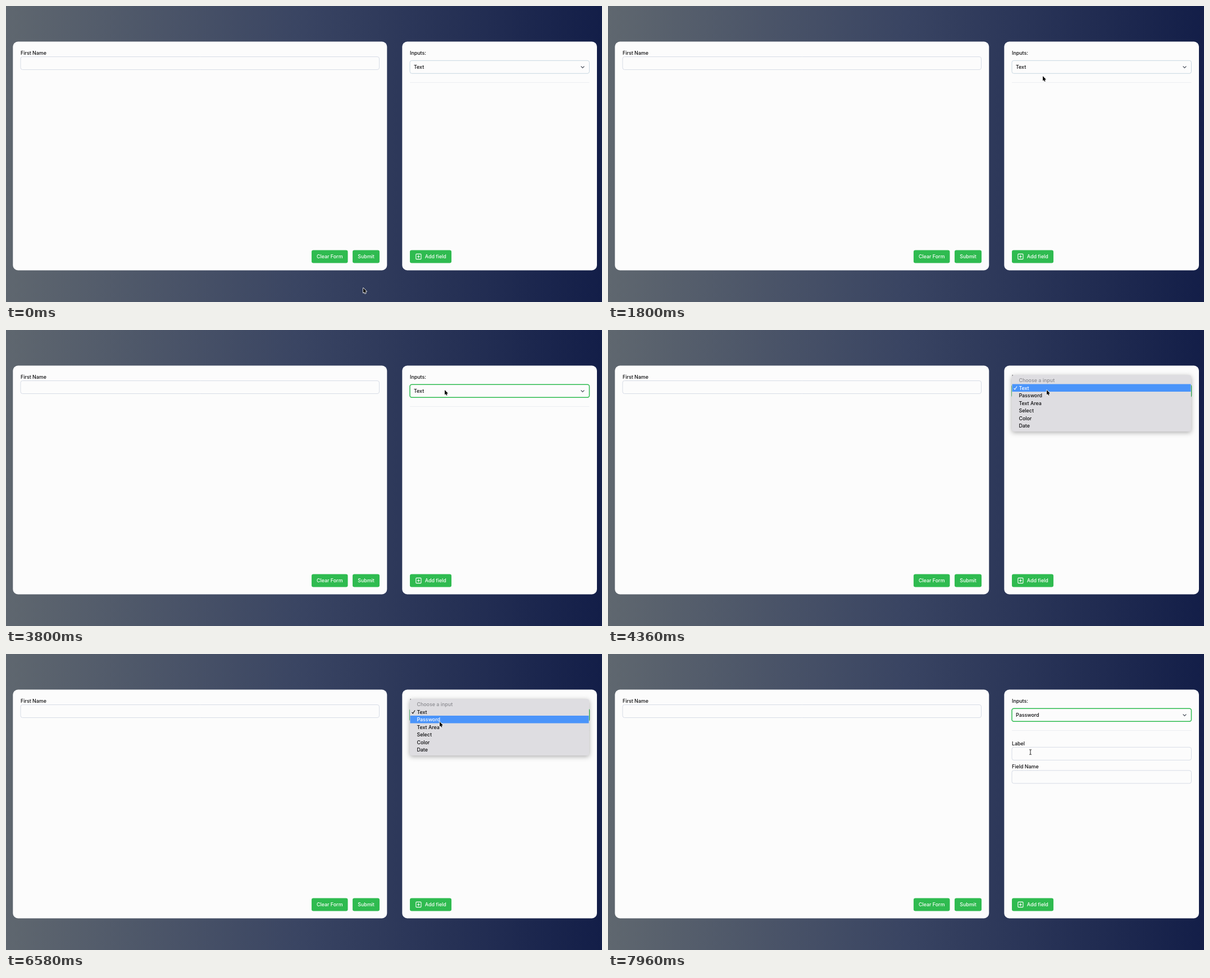
Write an HTML page with a canvas that moves like this. It is 1061x528 px and loops after 8000 ms.

```html
<!DOCTYPE html>
<html lang="en">
<head>
<meta charset="utf-8">
<title>Form builder</title>
<style>
html, body { margin: 0; width: 100%; height: 100%; overflow: hidden; background: #394462; }
canvas { display: block; }
</style>
</head>
<body>
<canvas id="stage" width="1061" height="528"></canvas>
<script>
const stage = document.getElementById('stage');
const c = stage.getContext('2d');
const LOOP = 8000;
const FOCUS = 3760, OPEN = 3900, CLOSE = 6740, IBEAM = 7060;
const GREEN = '#2fbb50', PAPER = '#fcfcfc', INK = '#0b0b0d', EDGE = '#d7dce6';
const OPTIONS = ['Choose a input', 'Text', 'Password', 'Text Area', 'Select', 'Color', 'Date'];
const LEFT = 719, WIDE = 319.5, BOX_H = 23;
const MENU_Y = 83.1, ROW = 13.5;

// resting and turning points of the pointer
const PATH = [
  { t: 0, x: 636, y: 503 },
  { t: 840, x: 685, y: 329 },
  { t: 1800, x: 774, y: 125 },
  { t: 3080, x: 775, y: 115 },
  { t: 3240, x: 781, y: 107 },
  { t: 4500, x: 781, y: 107 },
  { t: 5160, x: 776, y: 112 },
  { t: 6580, x: 772, y: 121 },
  { t: 7120, x: 766, y: 166 },
  { t: 7960, x: 752, y: 175 }
];

// slope that never overshoots: zero at turns, harmonic mean elsewhere
function slope(i, axis) {
  if (i < 1 || i > PATH.length - 2) return 0;
  const rate = k => (PATH[k + 1][axis] - PATH[k][axis]) / (PATH[k + 1].t - PATH[k].t);
  const a = rate(i - 1), b = rate(i);
  return a * b > 0 ? 2 * a * b / (a + b) : 0;
}

function follow(t, axis) {
  const last = PATH.length - 1;
  if (t >= PATH[last].t) return PATH[last][axis];
  const i = PATH.findIndex(p => p.t > t) - 1;
  const p = PATH[i], q = PATH[i + 1], d = q.t - p.t;
  const u = (t - p.t) / d, v = 1 - u;
  return p[axis] * (1 + 2 * u) * v * v + slope(i, axis) * d * u * v * v +
         q[axis] * u * u * (3 - 2 * u) - slope(i + 1, axis) * d * u * u * v;
}

function box(x, y, w, h, r, fill, stroke, width = 1) {
  c.beginPath();
  c.roundRect(x, y, w, h, r);
  if (fill) { c.fillStyle = fill; c.fill(); }
  if (stroke) { c.strokeStyle = stroke; c.lineWidth = width; c.stroke(); }
}

function text(s, x, y, color = INK, align = 'left') {
  c.font = '500 8.9px Inter, "Open Sans", sans-serif';
  c.textAlign = align;
  c.fillStyle = color;
  c.fillText(s, x, y);
}

function line(points, color, width = 1.1) {
  c.beginPath();
  for (const [x, y] of points) c.lineTo(x, y);
  c.strokeStyle = color;
  c.lineWidth = width;
  c.stroke();
}

function panel(x, w) {
  box(x, 63.5, w, 408, 9, PAPER);
}

function button(label, x, w, inset = 0) {
  box(x, 435.5, w, BOX_H, 3.2, GREEN);
  text(label, x + (w + inset) / 2, 450.2, '#fbfffb', 'center');
}

function field(label, x, y, w) {
  text(label, x, y - 3.7);
  box(x, y, w, BOX_H, 3.5, PAPER, EDGE);
}

function background() {
  const g = c.createLinearGradient(0, 0, stage.width, 0);
  ['#5f676f', '#394462', '#131e48'].forEach((s, i) => g.addColorStop(i / 2, s));
  c.fillStyle = g;
  c.fillRect(0, 0, stage.width, stage.height);
}

function formPanel() {
  panel(12.3, 666);
  field('First Name', 26, 90.5, 638.5);
  button('Clear Form', 544, 64.5);
  button('Submit', 617, 48);
}

function plusIcon(x, y) {
  box(x - 4.6, y - 4.6, 9.2, 9.2, 1, null, '#fff', 1.1);
  line([[x, y - 2.5], [x, y + 2.5]], '#fff');
  line([[x - 2.5, y], [x + 2.5, y]], '#fff');
}

function toolPanel(t) {
  const focused = t >= FOCUS, chosen = t >= CLOSE;
  panel(705.3, 346.7);
  text('Inputs:', LEFT, 87);
  box(LEFT, 97.3, WIDE, BOX_H, 3.5, PAPER, focused ? GREEN : '#c9d8e2', focused ? 1.5 : 1);
  text(OPTIONS[chosen ? 2 : 1], LEFT + 7, 112.1);
  line([[1023.6, 107.5], [1026.5, 110.4], [1029.4, 107.5]], '#4b515c');
  line([[LEFT, 136.5], [LEFT + WIDE, 136.5]], '#eceef2', 1);
  if (chosen) ['Label', 'Field Name'].forEach((s, i) => field(s, LEFT, 166.3 + i * 41.5, WIDE));
  button('Add field', LEFT, 74, 17.5);
  plusIcon(LEFT + 15.4, 447);
}

function menu(pointerY) {
  const active = Math.floor((pointerY - MENU_Y) / ROW);
  c.save();
  c.shadowColor = 'rgba(0,0,0,.32)';
  c.shadowBlur = 9;
  c.shadowOffsetY = 2;
  box(LEFT, MENU_Y - 2.5, WIDE - 0.5, ROW * OPTIONS.length + 6, 3.5, '#dedde1');
  c.restore();
  OPTIONS.forEach((name, i) => {
    const y = MENU_Y + i * ROW, on = i === active;
    if (on) box(LEFT + 0.5, y, WIDE - 1.5, ROW, 0, '#4a94fa');
    const color = on ? '#fff' : i ? INK : '#8b8b90';
    text(name, LEFT + 12.4, y + 10.2, color);
    if (i === 1) line([[722.6, y + 7.2], [724.3, y + 9.5], [728, y + 3.9]], color);
  });
}

function arrow(x, y) {
  const shape = new Path2D('M0 0V8.6L1.9 6.9 3.2 9.8 4.6 9.2 3.4 6.4 6 6.3Z');
  c.save();
  c.translate(x, y);
  c.lineJoin = 'round';
  c.lineWidth = 1.6;
  c.strokeStyle = '#fff';
  c.stroke(shape);
  c.fillStyle = '#000';
  c.fill(shape);
  c.restore();
}

function ibeam(x, y) {
  line([[x, y - 4], [x, y + 4]], '#222', 1);
  for (const s of [-4, 4]) line([[x - 2, y + s * 1.1], [x, y + s], [x + 2, y + s * 1.1]], '#222', 0.9);
}

function draw(now) {
  const t = now % LOOP, x = follow(t, 'x'), y = follow(t, 'y');
  background();
  formPanel();
  toolPanel(t);
  if (t >= OPEN && t < CLOSE) menu(y);
  (t >= IBEAM ? ibeam : arrow)(x, y);
}

const start = performance.now();
function tick() {
  draw(performance.now() - start);
  requestAnimationFrame(tick);
}
tick();
</script>
</body>
</html>
```
